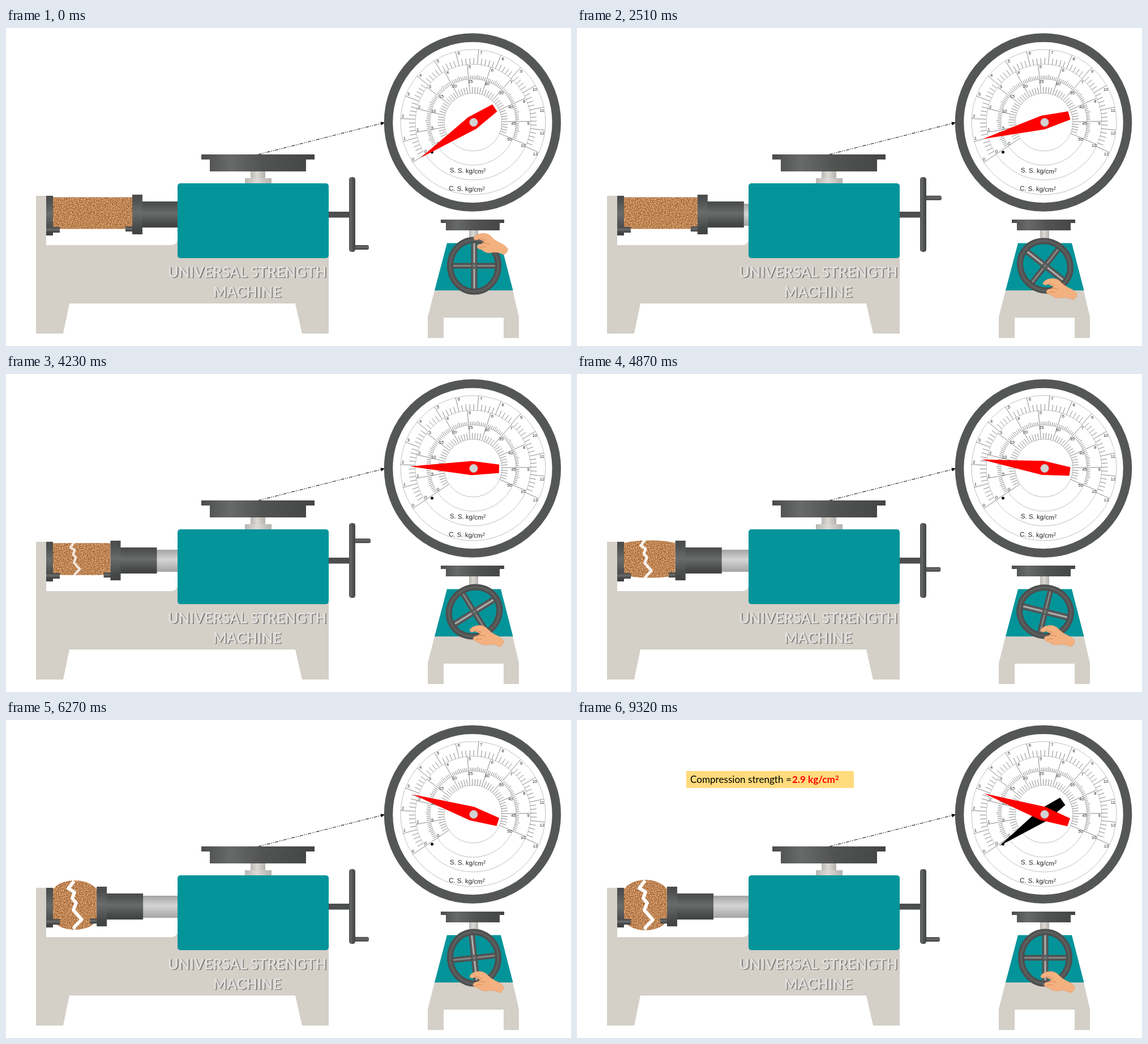
These frames come from a looping animation (998x561 px, 9.86 s). An HTML page:

```html
<!DOCTYPE html>
<html lang="en">
<head>
<meta charset="utf-8">
<title>Universal strength machine</title>
<style>
html, body { margin: 0; width: 100%; height: 100%; overflow: hidden; background: #fff; }
svg { display: block; width: 100%; height: 100%; }
.bed { fill: #d4cfc7; }
.teal { fill: #03949a; }
.title { font: 700 25.7px Lato, "Open Sans", sans-serif; text-anchor: middle; }
.note { font: 17.1px Lato, "Open Sans", sans-serif; }
.dial { font: 7.6px "Liberation Sans", Arial, sans-serif; text-anchor: middle; fill: #222; }
.unit { font-size: 11.5px; }
.rings { fill: none; stroke: #a5a5a5; stroke-width: .7; }
#ticks { fill: none; stroke: #555; stroke-width: .7; }
</style>
</head>
<body>
<svg viewBox="0 0 998 561" preserveAspectRatio="none">
  <defs>
    <linearGradient id="metalV" x2="0" y2="1">
      <stop offset="0" stop-color="#4a4b4b"/><stop offset=".15" stop-color="#505151"/>
      <stop offset=".45" stop-color="#6a6b6b"/><stop offset=".85" stop-color="#474949"/>
      <stop offset="1" stop-color="#404242"/>
    </linearGradient>
    <linearGradient id="metalH">
      <stop offset="0" stop-color="#4b4c4c"/><stop offset=".25" stop-color="#686969"/>
      <stop offset=".55" stop-color="#515252"/><stop offset="1" stop-color="#444545"/>
    </linearGradient>
    <linearGradient id="steelV" x2="0" y2="1">
      <stop offset="0" stop-color="#a4a4a4"/><stop offset=".45" stop-color="#d4d4d4"/>
      <stop offset="1" stop-color="#a4a4a4"/>
    </linearGradient>
    <linearGradient id="steelH">
      <stop offset="0" stop-color="#b9b7b3"/><stop offset=".45" stop-color="#dddad5"/>
      <stop offset="1" stop-color="#b3b1ad"/>
    </linearGradient>
    <linearGradient id="spoke">
      <stop offset="0" stop-color="#4c4e4e"/><stop offset=".3" stop-color="#5e5f5f"/>
      <stop offset=".5" stop-color="#c9c9c9"/><stop offset=".7" stop-color="#5e5f5f"/>
      <stop offset="1" stop-color="#4c4e4e"/>
    </linearGradient>
    <filter id="cork" x="0" y="0" width="1" height="1" color-interpolation-filters="sRGB">
      <feTurbulence type="fractalNoise" baseFrequency=".65" numOctaves="2" seed="4"/>
      <feColorMatrix values=".9 0 0 0 .3  .95 0 0 0 .05  .85 0 0 0 -.09  0 0 0 0 1"/>
    </filter>
    <clipPath id="sampleClip"><path id="sampleShape"/></clipPath>
  </defs>
  <rect width="998" height="561" fill="#fff"/>

  <!-- side view -->
  <path class="bed" d="M53 296H71V383H294Q302 381 304 373H570V539H523L511 486H112L101 539H53Z"/>
  <g clip-path="url(#sampleClip)"><rect x="83" y="275" width="142" height="102" filter="url(#cork)"/></g>
  <path id="crack" fill="none" stroke="#fff" stroke-width="6" stroke-linejoin="round"
    d="M-2-43L-12-30L-1-23L-5-12L2-4L-3 9L12 26L1 37L-3 43"/>
  <g fill="url(#metalV)">
    <rect x="71" y="296" width="12" height="70"/>
    <rect x="71" y="351" width="24" height="10"/>
  </g>
  <rect x="235" y="310" width="75" height="39" fill="url(#steelV)"/>
  <g id="piston" fill="url(#metalV)">
    <rect x="240" y="306" width="65" height="46"/>
    <rect x="211" y="350" width="14" height="9"/>
    <rect x="223" y="294" width="18" height="70"/>
  </g>
  <rect class="teal" x="303" y="274" width="267" height="132" rx="5"/>
  <rect x="432" y="252" width="26" height="14" fill="url(#steelH)"/>
  <rect x="422" y="265" width="47" height="9" fill="url(#steelH)"/>
  <path fill="url(#metalH)" d="M345 223H545V232H530V253H360V232H345Z"/>
  <rect x="570" y="324" width="37" height="10.500" fill="#4d4f4f"/>
  <rect id="handle" x="614" y="-4" height="8" rx="3" fill="url(#metalV)"/>
  <rect x="606" y="263" width="11" height="132" rx="4.5" fill="url(#metalH)"/>
  <g class="title">
    <g fill="#777573" transform="translate(1.6 1.6)"><text x="426" y="439.5">UNIVERSAL STRENGTH</text><text x="426" y="474.5">MACHINE</text></g>
    <g fill="#e1dfdc"><text x="426" y="439.5">UNIVERSAL STRENGTH</text><text x="426" y="474.5">MACHINE</text></g>
  </g>

  <!-- dial -->
  <ellipse cx="824" cy="166.5" rx="148.5" ry="149.5" fill="#fff" stroke="#555757" stroke-width="15.5"/>
  <g class="rings">
    <circle cx="825" cy="166" r="51"/><circle cx="825" cy="166" r="76"/>
    <circle cx="825" cy="166" r="102"/><circle cx="825" cy="166" r="128"/>
  </g>
  <path id="ticks"/>
  <g class="dial">
    <g id="numbers"></g>
    <g class="unit">
      <text x="815.5" y="256" transform="rotate(2.5 816 253)">S. S. kg/cm<tspan dy="-4" font-size="8">2</tspan></text>
      <text x="814" y="288" transform="rotate(2.5 814 284)">C. S. kg/cm<tspan dy="-4" font-size="8">2</tspan></text>
    </g>
  </g>
  <circle cx="752.5" cy="219" r="2.5"/>
  <path id="black" d="M-98 0L-3-12L39-8V8L-3 12Z"/>
  <path id="red" fill="#f00" d="M-113 0L-3-12.5L45-7.5V7.5L-3 12.5Z"/>
  <circle cx="826" cy="166.5" r="7.2" fill="#d3d3d3" stroke="#bdb5b5" stroke-width=".8"/>
  <path d="M446 223L663 168.3" stroke="#111" stroke-width="1.1" stroke-dasharray="6 2 1.5 2 1.5 2"/>
  <path d="M669 166.7L661.5 165.4L663 171.7Z"/>

  <!-- front view -->
  <rect x="818" y="356" width="16" height="24" fill="url(#steelH)"/>
  <path fill="url(#metalH)" d="M768 338H880V344H872V357H777V344H768Z"/>
  <path class="bed" d="M757 463H895L906 510V547H879V511H773V547H745V510Z"/>
  <path class="teal" d="M779 379.500H874L895.500 463H757Z"/>
  <g id="wheel">
    <rect x="-42" y="-5" width="84" height="10" fill="#505252"/>
    <rect x="-42" y="-1.500" width="84" height="3" fill="#858686"/>
    <rect x="-5.500" y="-46" width="11" height="92" fill="url(#spoke)"/>
    <circle r="5.5" fill="#5a5b5b"/><circle r="2.5" fill="#777"/>
    <ellipse rx="42.5" ry="45.5" fill="none" stroke="#4d4f4f" stroke-width="11"/>
    <ellipse rx="42.5" ry="45.5" fill="none" stroke="#5c5e5e" stroke-width="4"/>
  </g>
  <g id="hand">
    <path fill="#f4b180" stroke="#e39a66" stroke-width=".7" d="M827 371Q829 366 836 363.500Q848 360 856 366Q864 375 873 379Q883 383 887.500 390Q886 397 880 400Q869 394 860 396Q850 399 841 391Q834 390 833 386Q834 381 840 381L846 377Q841 374 836 372.500Q829 376 827 371Z"/>
    <path fill="none" stroke="#d58a55" stroke-width="1.1" d="M836 372Q842 370 848 375M840 381Q848 378 855 382M838 388Q844 384 849 387"/>
  </g>

  <g id="note" class="note" opacity="0">
    <rect x="193" y="90" width="296" height="30" fill="#ffdb7d"/>
    <text x="200" y="111">Compression strength =</text>
    <text x="380" y="111" fill="#f00" font-weight="700">2.9 kg/cm<tspan dy="-5" font-size="11.500">2</tspan></text>
  </g>
</svg>
<script>
const LOOP = 9860, STEP = 40, ZERO = 146.1;
const el = id => document.getElementById(id);
const set = (id, attrs) => { for (const k in attrs) el(id).setAttribute(k, attrs[k]); };
const clamp = (v, lo, hi) => Math.min(hi, Math.max(lo, v));

// Straight-line interpolation through [time, value] pairs.
function track(keys, s) {
  if (s <= keys[0][0]) return keys[0][1];
  for (let i = 1; i < keys.length; i++) {
    const [a, va] = keys[i - 1], [b, vb] = keys[i];
    if (s <= b) return va + (vb - va) * (s - a) / (b - a);
  }
  return keys[keys.length - 1][1];
}

// Times in seconds after the crank starts to turn.
const needle = [[0, -33.9], [5, 14.7], [5.88, 18.8]];
const push = [[0, 0], [1, -1], [2, -11], [3, -26], [4, -45.5], [5, -59], [5.88, -64]];
const turn = [[0, 0], [1.04, 72], [2.84, 187], [3.64, 238], [4.92, 330], [5.88, 360]];
const crank = [[0, 0], [1.04, 60], [2.84, 180], [3.64, 235], [4.92, 338], [5.88, 360]];
const grip = [[0, -60], [1, 0], [2, 70]];
const bulge = [[3.6, 0], [4, 2], [4.92, 12], [5.88, 16.5]];
const crackSize = [[2, .35], [2.84, .52], [3.64, .69], [4.92, .9], [5.88, 1]];
const crackAlpha = [[2, 0], [2.84, .6], [3.64, .8], [4.92, 1]];

function polar(r, deg) {
  const a = deg * Math.PI / 180;
  return [824.5 + r * Math.cos(a), 166 + r * Math.sin(a)].map(v => v.toFixed(1));
}

function drawScale(count, unit, step, parts, r, minor, outer) {
  let path = '', labels = '';
  for (let i = 0; i <= count * parts; i++) {
    const a = ZERO + i * step / parts, major = i % parts === 0;
    const len = i * 2 % parts === 0 ? minor + 2 : minor;
    path += `M${polar(r, a)}L${polar(major ? outer : r + len, a)}`;
    if (major) {
      const [x, y] = polar(outer - 4, a + 2.3);
      labels += `<text x="${x}" y="${+y + 2.7}">${i / parts * unit}</text>`;
    }
  }
  el('ticks').setAttribute('d', (el('ticks').getAttribute('d') || '') + path);
  el('numbers').innerHTML += labels;
}
drawScale(13, 1, 18.36, 5, 102, 11, 128);
drawScale(10, 1, 23.68, 10, 76, 6, 102);
drawScale(10, 5, 23.68, 5, 51, 11, 76);

// The sample between the plates, its top and bottom swollen by b.
function sample(right, b) {
  const inset = (right - 83) * .2, rise = b / .75;
  return `M83 298.5C${83 + inset} ${298.5 - rise} ${right - inset} ${298.5 - rise} ${right} 298.5` +
    `V354.5C${right - inset} ${354.5 + rise} ${83 + inset} ${354.5 + rise} 83 354.5Z`;
}

function render(t) {
  const s = clamp(Math.floor((t - 590) / STEP) * STEP / 1000, 0, 5.88);
  const back = clamp(Math.floor((t - 7220) / STEP) / 25, 0, 1);
  const fade = clamp(Math.floor((t - 8800) / STEP) / 13, 0, 1);
  const angle = track(needle, s), x = track(push, s);

  set('red', { transform: `translate(826 166) rotate(${angle})` });
  set('black', {
    transform: `translate(826 166) rotate(${angle + (-35.1 - angle) * back})`,
    visibility: back > 0 ? 'visible' : 'hidden'
  });
  set('piston', { transform: `translate(${x} 0)` });
  set('sampleShape', { d: sample(223 + x, track(bulge, s)) });
  set('crack', {
    transform: `translate(122 326.5) scale(${track(crackSize, s)})`,
    opacity: track(crackAlpha, s)
  });

  const up = Math.cos(track(crank, s) * Math.PI / 180);
  set('handle', { transform: `translate(0 ${328 + 59 * up})`, width: 29 - 2 * up });
  set('wheel', { transform: `translate(827 419.5) rotate(${track(turn, s)})` });
  const g = track(grip, s) * Math.PI / 180;
  set('hand', { transform: `translate(${45 * Math.cos(g) - 23.5} ${39 + 45 * Math.sin(g)})` });
  set('note', { opacity: fade });
}

const start = performance.now();
function frame() {
  render((performance.now() - start) % LOOP);
  requestAnimationFrame(frame);
}
frame();
</script>
</body>
</html>
```
